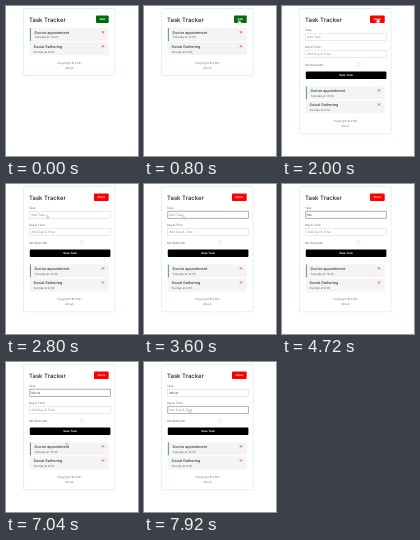
These frames come from a looping animation (132x150 px, 8 s). An HTML page:

```html
<!DOCTYPE html>
<html lang="en">
<head>
<meta charset="utf-8">
<title>Task Tracker</title>
<style>
html, body { margin: 0; width: 100%; height: 100%; overflow: hidden; background: #fff; }
svg { display: block; width: 100vw; height: 100vh; font-family: Inter, "Open Sans", sans-serif; fill: #222; text-rendering: geometricPrecision; }
svg * { animation-duration: 8s; animation-iteration-count: infinite; animation-timing-function: step-end; }

.card { fill: #fff; stroke: #c4e2ec; stroke-width: .5; height: 125.2px; animation-name: grow; }
.list { transform: translateY(58.2px); animation-name: drop; }
.late { animation-name: open; }
.early { opacity: 0; animation-name: close; }

.title { font-size: 6px; font-weight: 500; }
.btn { font-size: 2.8px; font-weight: 600; fill: #fff; text-anchor: middle; }
.name { font-size: 3.65px; font-weight: 500; fill: #333; }
.small { font-size: 2.9px; fill: #666; }
.foot { text-anchor: middle; fill: #777; }
.row { fill: #f4f4f4; }
.x { stroke: #f22; stroke-width: .7; fill: none; }
.field { fill: #fff; stroke: #c4c4c4; stroke-width: .35; }
.hint { font-size: 3.1px; fill: #909090; }
.typed { font-size: 3.2px; fill: #444; }
.ring { fill: none; stroke: #777; stroke-width: .5; }

#ring1 { opacity: 0; animation-name: ring1; }
#ring2 { animation-name: ring2; }
#hint1 { opacity: 0; animation-name: hint; }
.typed tspan:nth-child(1) { animation-name: k1; }
.typed tspan:nth-child(2) { animation-name: k2; }
.typed tspan:nth-child(3) { animation-name: k3; }
.typed tspan:nth-child(4) { animation-name: k4; }
.typed tspan:nth-child(5) { animation-name: k5; }

#mouse { animation-name: move; animation-timing-function: ease-in-out; }
#seen { animation-name: seen; }
#mouse path { fill: #fff; stroke: #777; stroke-width: .3; stroke-linejoin: round; }
#arrow { animation-name: arrow; }
#hand { opacity: 0; animation-name: hand; }

@keyframes grow { 0% { height: 67px; } 23%, 100% { height: 125.2px; } }
@keyframes drop { 0% { transform: none; } 23%, 100% { transform: translateY(58.2px); } }
@keyframes open { 0% { opacity: 0; } 23%, 100% { opacity: 1; } }
@keyframes close { 0% { opacity: 1; } 23%, 100% { opacity: 0; } }
@keyframes ring1 { 0% { opacity: 0; } 40% { opacity: 1; } 91%, 100% { opacity: 0; } }
@keyframes ring2 { 0% { opacity: 0; } 91%, 100% { opacity: 1; } }
@keyframes hint { 0% { opacity: 1; } 53%, 100% { opacity: 0; } }
@keyframes k1 { 0% { fill-opacity: 0; } 53%, 100% { fill-opacity: 1; } }
@keyframes k2 { 0% { fill-opacity: 0; } 59%, 100% { fill-opacity: 1; } }
@keyframes k3 { 0% { fill-opacity: 0; } 65%, 100% { fill-opacity: 1; } }
@keyframes k4 { 0% { fill-opacity: 0; } 66%, 100% { fill-opacity: 1; } }
@keyframes k5 { 0% { fill-opacity: 0; } 71%, 100% { fill-opacity: 1; } }
@keyframes move {
  0%, 1% { transform: translate(60px, 82px); }
  11%, 28% { transform: translate(95.5px, 12.5px); }
  36%, 81% { transform: translate(39px, 31.3px); }
  86%, 87% { transform: translate(62px, 85px); }
  91%, 100% { transform: translate(45px, 48px); }
}
@keyframes seen { 0% { opacity: 0; } 1% { opacity: 1; } 53% { opacity: 0; } 81%, 100% { opacity: 1; } }
@keyframes arrow { 0% { opacity: 1; } 10% { opacity: 0; } 29%, 100% { opacity: 1; } }
@keyframes hand { 0% { opacity: 0; } 10% { opacity: 1; } 29%, 100% { opacity: 0; } }
</style>
</head>
<body>
<svg viewBox="0 0 132 150">
  <rect class="card" x="17.5" y="2.6" width="91.6" rx=".9"/>
  <text class="title" x="23" y="15.6">Task Tracker</text>

  <g class="early">
    <rect x="90" y="9.6" width="12.7" height="7.4" rx=".9" fill="#006c0c"/>
    <text class="btn" x="96.3" y="14.3">Add</text>
  </g>

  <g class="late">
    <rect x="88" y="9.6" width="14.7" height="7.4" rx=".9" fill="#f00"/>
    <text class="btn" x="95.3" y="14.3">Close</text>

    <text class="small" x="23" y="25">Task</text>
    <rect class="field" x="23.8" y="27.2" width="80.6" height="7.2"/>
    <text class="hint" id="hint1" x="25.2" y="31.9">Add Task</text>
    <text class="typed" x="25.2" y="31.9"><tspan>M</tspan><tspan>o</tspan><tspan>v</tspan><tspan>i</tspan><tspan>e</tspan></text>
    <rect class="ring" id="ring1" x="23.8" y="27.2" width="80.6" height="7.2" rx=".4"/>

    <text class="small" x="23" y="42.4">Day &amp; Time</text>
    <rect class="field" x="23.8" y="44.4" width="80.6" height="7.2"/>
    <text class="hint" x="25.2" y="49.1">Add Day &amp; Time</text>
    <rect class="ring" id="ring2" x="23.8" y="44.4" width="80.6" height="7.2" rx=".4"/>

    <text class="small" x="23" y="59.6">Set Reminder</text>
    <rect class="field" x="74.6" y="56.8" width="3.4" height="3.4" rx=".4"/>
    <rect x="23.8" y="65.6" width="80.6" height="7.4" rx=".9" fill="#000"/>
    <text class="btn" x="64" y="70.3">Save Task</text>
  </g>

  <g class="list">
    <rect class="row" x="23.7" y="22" width="79" height="13.2"/>
    <rect x="23.9" y="22" width=".8" height="13.2" fill="#2c8f3a"/>
    <text class="name" x="28.5" y="27.7">Doctor appointment</text>
    <text class="small" x="28.5" y="32.4">Tuesday at 14:30</text>
    <path class="x" d="M96 25.2l2 2m0-2l-2 2"/>

    <rect class="row" x="23.7" y="36.1" width="79" height="13.2"/>
    <text class="name" x="27.6" y="41.8">Social Gathering</text>
    <text class="small" x="27.6" y="46.5">Sunday at 8:00</text>
    <path class="x" d="M96 39.3l2 2m0-2l-2 2"/>

    <text class="small foot" x="63.3" y="58">Copyright © 2021</text>
    <text class="small foot" x="63.3" y="62.7">About</text>
  </g>

  <g id="mouse">
    <g id="seen">
      <path id="arrow" d="M0 0v3.4l.8-.7.6 1.2.6-.3-.6-1.1h1z"/>
      <path id="hand" d="M-.4 0h.8v1.3l2 .5v1.6l-.6 1h-2.2l-1.4-1.9.5-.4.9.6z"/>
    </g>
  </g>
</svg>
</body>
</html>
```
